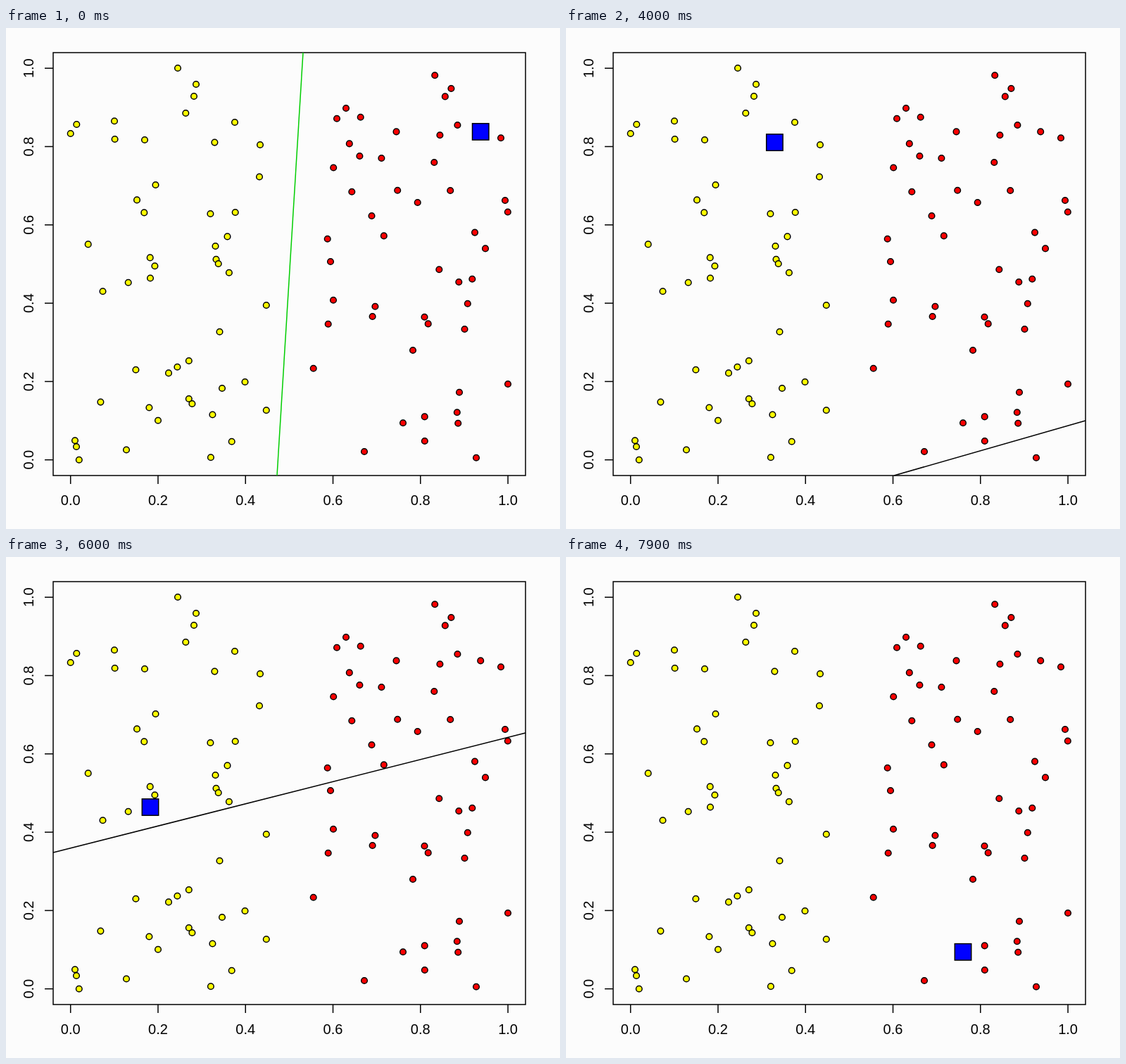
These frames come from a looping animation (787x712 px, 8 s). An HTML page:

```html
<!DOCTYPE html>
<html lang="en">
<head>
<meta charset="utf-8">
<title>Separating two classes</title>
<style>
  html, body { margin: 0; width: 100%; height: 100%; overflow: hidden; background: #fcfcfc; }
  svg { display: block; width: 787px; height: 712px; }
  text { font: 20px "Liberation Sans", Arial, sans-serif; text-anchor: middle; }
</style>
</head>
<body>
<svg id="plot" viewBox="0 0 787 712" stroke="#000" stroke-width="1.5"></svg>
<script>
const LOOP = 8000, FIRST = 500, RUN = 2500, STEP = 100;
const plot = document.getElementById("plot");

// Dot centres, x and y in turn.
const yellow = [
  244,57, 270,80, 267,97, 255.3,121, 154,132.3, 100.3,137, 91.7,150, 154.6,158, 197,159, 325,134,
  296.4,162.6, 361,166, 360,211.5, 212.5,223, 186,244.4, 196.3,262.4, 290.4,264, 325.7,262, 116.7,307.4, 314.5,296.4,
  297.5,310, 298.5,328.7, 301.7,335, 316.9,347.7, 204.7,326.4, 211.4,338.2, 205,355.5, 173.7,361.7, 137.5,374.2, 369.8,394,
  303.5,431.8, 259.8,473, 243.4,481.7, 231,490.4, 184.4,485.7, 339.5,503, 307,512, 259.8,527, 264.4,534, 134.4,531.6,
  203.4,539.5, 293.4,549.5, 369.8,543.2, 216,557.8, 98,586.3, 100,595, 103.8,613.7, 171,599.5, 320.7,587.8, 290.9,610.3
];
const red = [
  609.2,67.3, 632.4,86, 623.8,97.4, 483,114, 470,128.7, 503.7,126.7, 554.5,147.4, 641.4,138, 616.4,152.2, 674.2,147.4,
  703,156.2, 487.8,164.4, 502.4,182, 533.4,185, 465.2,198.5, 608.3,191, 491.3,232.8, 556.2,230.8, 631.2,231, 584.7,248,
  709,245, 712.8,261.5, 519.5,267, 536.8,295.4, 456.7,299.7, 461,332, 666,290.6, 681,313.4, 615.3,343.3, 643.3,361,
  662.3,356.7, 655.8,391.7, 465,386.8, 524.4,395.8, 520.6,410, 457.7,420.7, 594.5,410.7, 599.7,420.4, 651.5,428, 578,458,
  436.7,483.7, 713,506, 644,517.7, 640.8,546.2, 642.2,561.8, 594.7,552.4, 564,561.3, 594.8,587, 509,602, 668,610.7
];

// Dot visited at each step of the run.
const visits = [
  89, 24, 72, 51, 30, 83, 19, 31, 6,
  81, 35, 66, 27, 93, 43, 10, 78, 22,
  61, 15, 99, 36, 87, 7, 53, 28, 67,
  84, 17, 2, 75, 40, 79, 12, 64, 26,
  88, 20, 54, 33, 68, 0, 96, 25, 45,
  83, 13, 50, 38, 76, 62, 23, 85, 16, 96
];
const START = 18, SOLVED = 59;

// Trial boundaries: first step, last step, endpoints.
const trials = [
  [6, 8, 439, 636, 738, 254],
  [14, 16, 466, 636, 738, 558],
  [20, 21, 67, 60, 330, 636],
  [30, 30, 67, 480, 560, 35],
  [34, 36, 67, 420, 738, 250]
];
const solution = [385, 636, 422, 35];

function add(tag, attrs, text) {
  const node = document.createElementNS("http://www.w3.org/2000/svg", tag);
  set(node, attrs);
  if (text) node.textContent = text;
  return plot.appendChild(node);
}

function set(node, attrs) {
  for (const key in attrs) node.setAttribute(key, attrs[key]);
}

const ends = ([x1, y1, x2, y2]) => ({ x1, y1, x2, y2 });

function drawAxes() {
  add("rect", { x: 67, y: 35, width: 671, height: 601, fill: "none" });
  for (let i = 0; i <= 5; i++) {
    const x = 91.7 + 124.27 * i, y = 613.7 - 111.3 * i, label = (i / 5).toFixed(1);
    add("line", ends([x, 636, x, 648]));
    add("line", ends([67, y, 55, y]));
    add("text", { x, y: 678, stroke: "none" }, label);
    add("text", { transform: `translate(39 ${y}) rotate(-90)`, stroke: "none" }, label);
  }
}

const dots = [];
function drawDots(list, fill) {
  for (let i = 0; i < list.length; i += 2) {
    const dot = { cx: list[i], cy: list[i + 1] };
    dots.push(dot);
    add("circle", { ...dot, r: 4.3, fill });
  }
}

drawAxes();
drawDots(yellow, "#ff0");
drawDots(red, "#f00");
const boundary = add("line", {});
const marker = add("rect", { width: 23.4, height: 23.4, fill: "#00f" });

function render(t) {
  const step = Math.floor((t - RUN) / STEP);
  const solved = t < FIRST;
  const dot = dots[solved ? SOLVED : t < RUN ? START : visits[step]];
  set(marker, { x: dot.cx - 11.7, y: dot.cy - 11.7 });

  const trial = trials.find(([from, to]) => step >= from && step <= to);
  const line = solved ? solution : trial && trial.slice(2);
  set(boundary, {
    ...(line && ends(line)),
    stroke: solved ? "#00cd00" : "#000",
    visibility: line ? "visible" : "hidden"
  });
}

const begin = performance.now();
function tick(now) {
  render(Math.max(0, now - begin) % LOOP);
  requestAnimationFrame(tick);
}
render(0);
requestAnimationFrame(tick);
</script>
</body>
</html>
```
